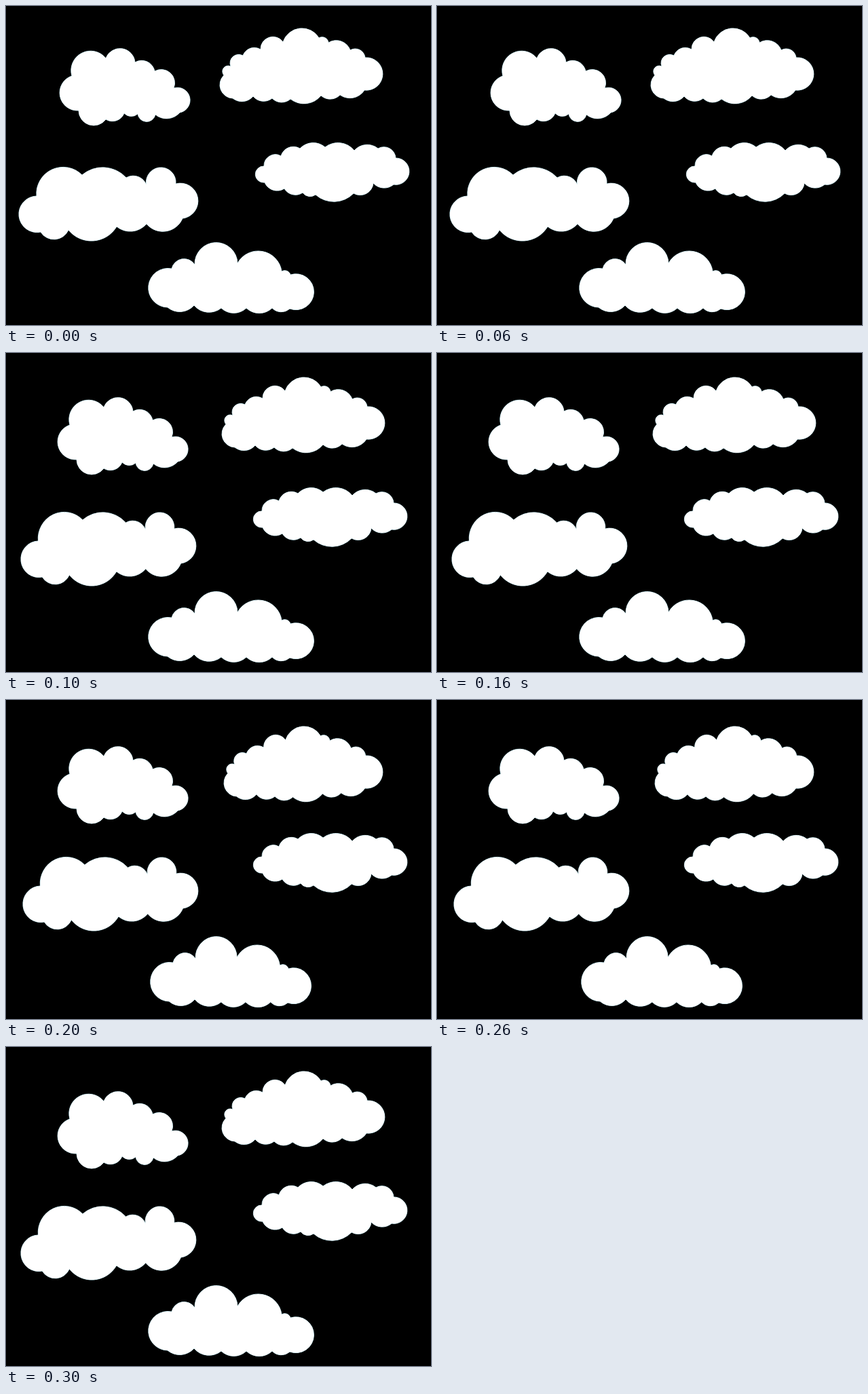
An HTML page with a canvas that plays this animation: 626 px wide and 470 px high, repeating every 0.4 s.

```html
<!DOCTYPE html>
<html lang="en">
<head>
<meta charset="utf-8">
<title>Clouds</title>
<style>
  html, body { margin: 0; width: 100%; height: 100%; overflow: hidden; background: #000; }
  canvas { display: block; }
</style>
</head>
<body>
<canvas id="sky" width="626" height="470"></canvas>
<script>
const ctx = document.getElementById('sky').getContext('2d');
const STEP = 100;
const POSES = [0, 1, 2, 1]; // the wobble goes out and back

// notches: dents of the outline, clockwise; a third value sets how far the next puff swells.
// left, right, down: how far each edge has moved in poses 0 to 2.
const clouds = [
  { from: 79, to: 269, left: [0, -3, -3], right: [0, -3, -3], down: [0, 3, 6],
    notches: `107 154 .44, 97 103 .41, 147 77 .4, 190 83, 219 96, 247 121, 256 157,
              220 160 .42, 194 159, 174 158, 147 167 .36` },
  { from: 316, to: 556, left: [0, 3, 6], right: [0, 3, 0], down: [0, 3, 6],
    notches: `334 136 .33, 321 102, 331 89, 349 73, 375 64 .37, 408 53 .32, 461 47, 475 54,
              507 65, 529 76, 528 124, 492 131, 464 132, 419 137, 392 136, 364 133` },
  { from: 368, to: 596, left: [0, -3, -3], right: [0, -3, -3], down: [0, -3, -5],
    notches: `381 260, 380 236, 405 221, 433 210, 470 208, 513 213, 548 210, 574 224,
              571 263, 541 261, 512 276, 456 278, 437 275, 410 269` },
  { from: 18, to: 284, left: [0, 3, 6], right: [0, -3, 0], down: [0, -3, -6],
    notches: `51 333, 45 280 .35, 112 249, 177 253, 208 268 .64, 250 262, 260 313 .28,
              207 321, 163 325 .26, 92 330 .3` },
  { from: 208, to: 455, left: [0, 0, 3], right: [0, 0, -4], down: [0, 3, 0],
    notches: `238 444, 244 387 .33, 278 381 .5, 341 379 .36, 406 391, 419 396 .7, 418 446,
              392 445, 354 445, 317 445, 277 441` }
];

// A circular arc between two notches; upright puffs swell more than flat ones.
function puff([x0, y0, swell], [x1, y1]) {
  const chord = Math.hypot(x1 - x0, y1 - y0);
  const bulge = swell ?? 0.2 + 0.35 * ((y1 - y0) / chord) ** 2;
  const radius = chord * (0.25 + bulge * bulge) / (2 * bulge);
  return `A${radius} ${radius} 0 ${bulge > 0.5 ? 1 : 0} 1 ${x1} ${y1}`;
}

function outline(text) {
  const notches = text.split(',').map(notch => notch.trim().split(' ').map(Number));
  const arcs = notches.map((notch, i) => puff(notch, notches[(i + 1) % notches.length]));
  const [x, y] = notches[0];
  return new Path2D(`M${x} ${y}${arcs.join('')}Z`);
}

for (const cloud of clouds) cloud.shape = outline(cloud.notches);

function drawCloud({ from, to, left, right, down, shape }, pose) {
  const scale = 1 + (right[pose] - left[pose]) / (to - from);
  ctx.setTransform(scale, 0, 0, 1, from + left[pose] - from * scale, down[pose]);
  ctx.stroke(shape);
  ctx.fill(shape);
}

function render() {
  const pose = POSES[Math.floor(performance.now() / STEP) % POSES.length];
  ctx.resetTransform();
  ctx.clearRect(0, 0, 626, 470);
  ctx.strokeStyle = '#b5e3ee';
  ctx.fillStyle = '#fff';
  for (const cloud of clouds) drawCloud(cloud, pose);
  requestAnimationFrame(render);
}
render();
</script>
</body>
</html>
```
